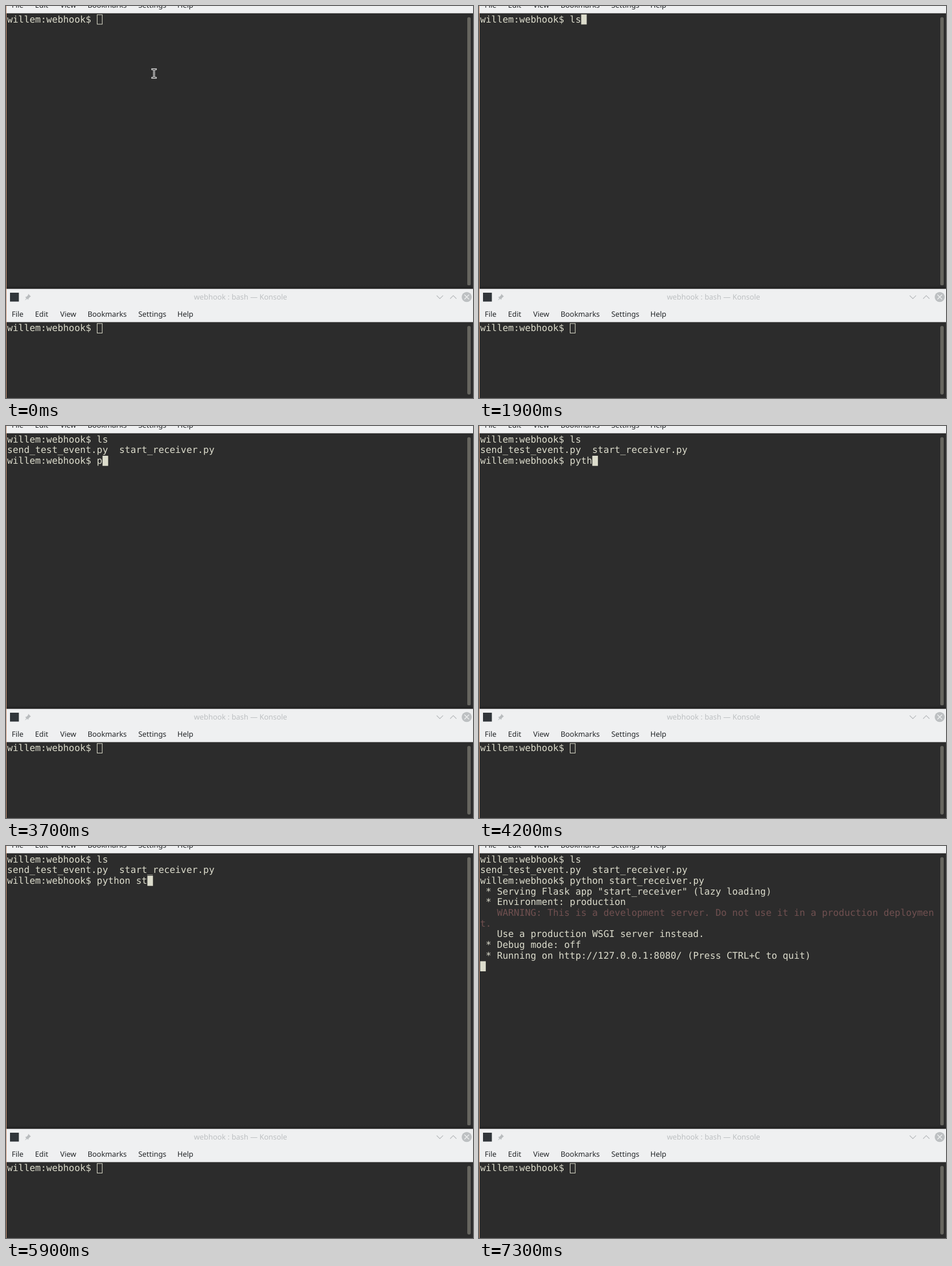
An HTML page that plays this animation: 817 by 685 pixels, repeating every 8 s.

```html
<!DOCTYPE html>
<html lang="en">
<head>
<meta charset="utf-8">
<title>Webhook terminal</title>
<style>
  html, body { margin: 0; width: 817px; height: 685px; overflow: hidden; background: #2c2c2c; }
  svg { display: block; }
  text { white-space: pre; text-rendering: geometricPrecision; }
  .term { font: 16.3px "DejaVu Sans Mono", monospace; fill: #dcdccc; }
  .term .warn { fill: #705050; }
  .ui { font: 12.9px "Noto Sans", sans-serif; fill: #232629; }
  .ui .title { fill: #bdc0c2; text-anchor: middle; }
  .caret { fill: #dcdccc; stroke: #dcdccc; }
  .hollow { fill: none; }
  .icon { fill: none; stroke: #b9bcbe; stroke-width: 1.2; }
</style>
</head>
<body>
<svg width="817" height="685" viewBox="0 0 817 685">
  <defs>
    <linearGradient id="shade" x2="0" y2="1">
      <stop offset="0" stop-color="#2c2c2c"/>
      <stop offset="1" stop-color="#212121"/>
    </linearGradient>
    <g id="window">
      <rect width="817" height="553" y="12.7" fill="#2c2c2c"/>
      <rect width="817" height="32" y="-19.3" fill="#eff0f1"/>
      <g class="ui">
        <text x="10" y="3">File</text>
        <text x="50.8" y="3">Edit</text>
        <text x="94.8" y="3">View</text>
        <text x="142.7" y="3">Bookmarks</text>
        <text x="231.5" y="3">Settings</text>
        <text x="299.7" y="3">Help</text>
      </g>
    </g>
  </defs>

  <use href="#window"/>
  <rect x="807" y="19.5" width="6" height="469" rx="3" fill="#66655f"/>
  <g class="term" id="lines"></g>
  <rect class="caret" id="caret" width="8.8" height="16.6"/>
  <g id="pointer" fill="none" stroke-linecap="square">
    <path id="beam" d="M-3-7.5H3M0-7.5V7.5M-3 7.5H3" stroke="#fff" stroke-width="3"/>
    <use href="#beam" style="display:none"/>
    <path d="M-3-7.5H3M0-7.5V7.5M-3 7.5H3" stroke="#1b1b1b"/>
  </g>

  <rect y="488" width="817" height="6.5" fill="url(#shade)"/>
  <use href="#window" y="539.7"/>
  <rect y="494.3" width="817" height="30" fill="#eff0f1"/>
  <rect x="7" y="501" width="15.5" height="15.5" fill="#31363b"/>
  <path d="M39 503L43.500 507.500L42 508.500L39.500 511L39 513.500L37 511.500L33 514.500L35.500 510.500L33.500 508.500L36 508L38.500 505.500Z" fill="#b9bcbe"/>
  <g class="ui"><text class="title" x="410.3" y="513.2">webhook : bash — Konsole</text></g>
  <path class="icon" d="M753.500 506L759 511.500L764.500 506M777 511.500L782.500 506L788 511.500"/>
  <circle cx="806" cy="508.5" r="8.8" fill="#bdc0c2"/>
  <path d="M802 504.500L810 512.500M810 504.500L802 512.500" stroke="#eff0f1" stroke-width="1.3"/>
  <rect x="807" y="559" width="6" height="120" rx="3" fill="#66655f"/>
  <g class="term"><text id="idle" x="2" y="568.2"></text></g>
  <rect class="caret hollow" x="159.5" y="554.9" width="8.8" height="16.6"/>
  <rect width="1" height="685" fill="#cf9a7c"/>
</svg>
<script>
const LOOP = 8000, CELL = 9.815, ROW = 18.67;
const PROMPT = "willem:webhook$ ";
const FOCUS_TIME = 500, TYPING_TIME = 1700;

const output = [
  [0, PROMPT],
  [1700, "l"], [1900, "s"],
  [2300, "\nsend_test_event.py  start_receiver.py\n" + PROMPT],
  [3700, "p"], [3900, "y"], [4000, "t"], [4200, "h"],
  [4800, "o"], [4900, "n"], [5000, " "],
  [5800, "s"], [5900, "t"], [6600, "art_receiver.py "],
  [7100, "\n"],
  [7300, ` * Serving Flask app "start_receiver" (lazy loading)
 * Environment: production
   WARNING: This is a development server. Do not use it in a production deploymen
t.
   Use a production WSGI server instead.
 * Debug mode: off
 * Running on http://127.0.0.1:8080/ (Press CTRL+C to quit)
`]
];

// time, x, y
const pointerPath = [
  [0, 259, 118], [200, 261, 111], [300, 264, 99], [400, 266, 90],
  [500, 267.5, 86], [800, 267.5, 89]
];

const byId = id => document.getElementById(id);
const lines = byId("lines"), caret = byId("caret"), pointer = byId("pointer");
byId("idle").textContent = PROMPT;

const rows = Array.from({ length: 11 }, (_, i) => {
  const row = document.createElementNS("http://www.w3.org/2000/svg", "text");
  row.setAttribute("x", 2);
  row.setAttribute("y", 28.5 + i * ROW);
  if (i === 5 || i === 6) row.setAttribute("class", "warn");
  return lines.appendChild(row);
});

function draw(t) {
  const text = output.filter(([at]) => at <= t).map(([, s]) => s).join("").split("\n");
  rows.forEach((row, i) => {
    const s = text[i] || "";
    if (row.textContent !== s) row.textContent = s;
  });

  const last = text.length - 1;
  caret.setAttribute("x", 2.5 + text[last].length * CELL);
  caret.setAttribute("y", 15.2 + last * ROW);
  caret.classList.toggle("hollow", t < FOCUS_TIME);

  const [, x, y] = pointerPath.filter(([at]) => at <= t).pop();
  pointer.setAttribute("transform", `translate(${x} ${y})`);
  pointer.style.display = t < TYPING_TIME ? "" : "none";
}

const start = performance.now();
function tick() {
  draw((performance.now() - start) % LOOP);
  requestAnimationFrame(tick);
}
tick();
</script>
</body>
</html>
```
